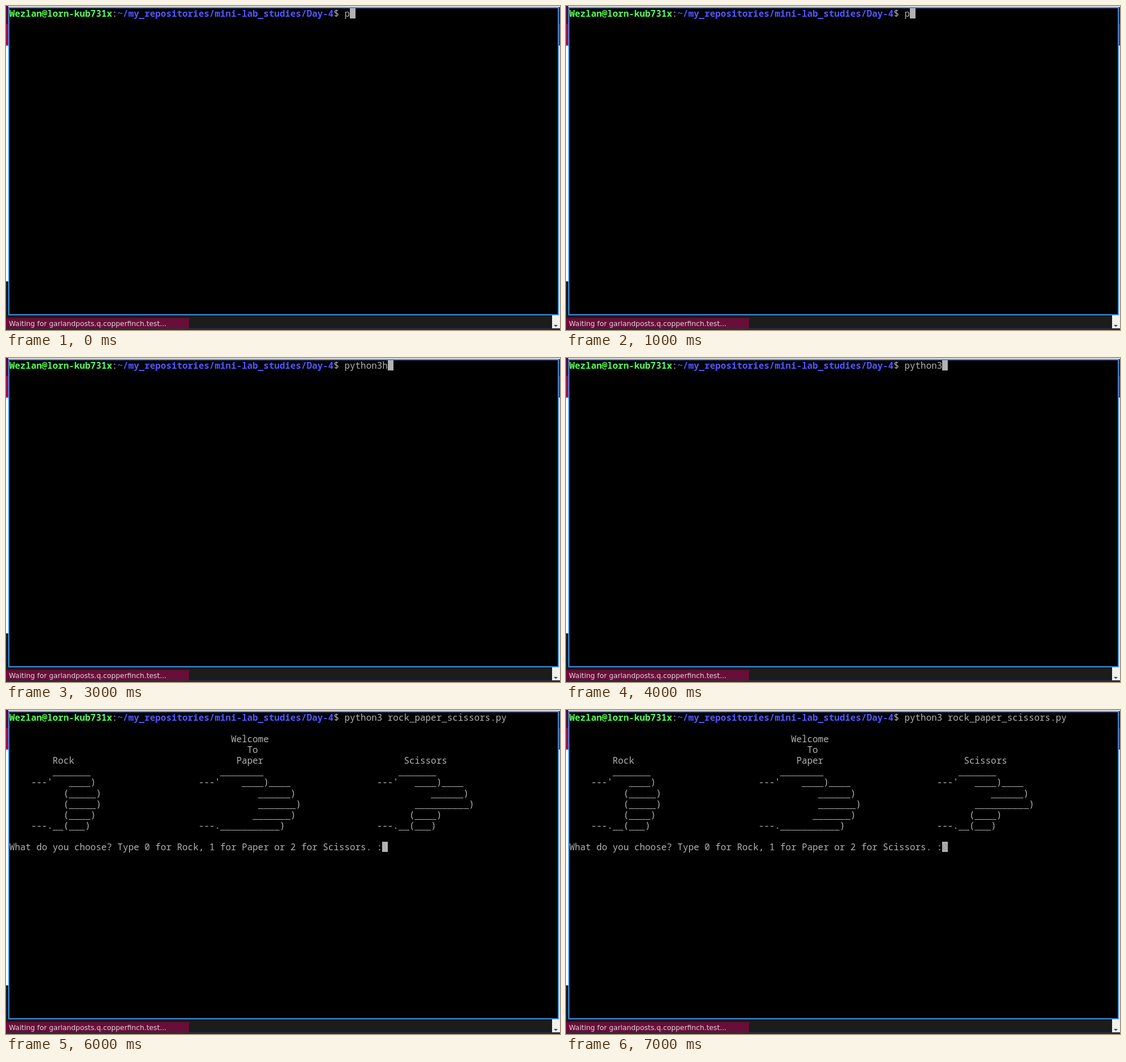
Recreate the animation shown at these times as an HTML page with a canvas. Size 978x573 px, loop 8000 ms.

```html
<!DOCTYPE html>
<html lang="en">
<head>
<meta charset="utf-8">
<title>Terminal game</title>
<style>
html, body { margin: 0; width: 978px; height: 573px; overflow: hidden; background: #000; }
canvas { display: block; }
</style>
</head>
<body>
<canvas id="stage" width="978" height="573"></canvas>
<script>
const ctx = document.getElementById("stage").getContext("2d");
const LOOP = 8000, STEP = 1000;
const CELL = 9.54, LINE = 19.08, LEFT = 6, TOP = 4;
const GREY = "#b2b2b2", GREEN = "#55ff55", BLUE = "#5555ff";
const COMMAND_COL = 62;

const COMMAND = "python3 rock_paper_scissors.py";
const typed = ["p", "p", "python3", "python3h", "python3", COMMAND + " ", COMMAND, COMMAND];
const QUESTION = "What do you choose? Type 0 for Rock, 1 for Paper or 2 for Scissors. :";

// [row, column, text, column, text, ...]
const output = [
  [2, 41, "Welcome"],
  [3, 44, "To"],
  [4, 8, "Rock", 42, "Paper", 73, "Scissors"],
  [5, 8, "_______", 39, "________", 72, "_______"],
  [6, 4, "---'   ____)", 35, "---'    ____)____", 68, "---'   ____)____"],
  [7, 10, "(_____)", 46, "______)", 78, "______)"],
  [8, 10, "(_____)", 46, "_______)", 75, "__________)"],
  [9, 10, "(____)", 45, "_______)", 74, "(____)"],
  [10, 4, "---.__(___)", 35, "---.___________)", 68, "---.__(___)"],
  [12, 0, QUESTION]
];

function rect(x, y, w, h, color) {
  ctx.fillStyle = color;
  ctx.fillRect(x, y, w, h);
}

// Places every glyph on the terminal grid; underscores join into solid lines.
function write(row, col, text, color = GREY, bold = false) {
  const baseline = Math.round(TOP + row * LINE + 15);
  ctx.font = `${bold ? "bold " : ""}15.9px "Noto Sans Mono", "DejaVu Sans Mono", monospace`;
  ctx.fillStyle = color;
  [...text].forEach((char, i) => {
    const x = LEFT + (col + i) * CELL;
    if (char === "_") ctx.fillRect(x, baseline + 2, CELL, bold ? 2 : 1);
    else ctx.fillText(char, x, baseline);
  });
  return col + text.length;
}

function cursor(row, col) {
  rect(Math.round(LEFT + col * CELL), Math.round(TOP + row * LINE), 10, 18, GREY);
}

function drawWindow() {
  rect(0, 0, 978, 573, "#1c1c1c");
  rect(0, 0, 978, 2, "#dcdcdc");
  rect(0, 0, 4, 32, "#5c0c30");
  rect(0, 32, 4, 38, "#a50a4c");
  rect(0, 70, 4, 417, "#fff");
  rect(976, 2, 2, 30, "#5c0c30");
  rect(976, 32, 2, 38, "#a50a4c");
  rect(976, 70, 2, 477, "#e4e4e4");
  rect(0, 570, 978, 3, "#292e3c");

  rect(964, 547, 14, 23, "#f0f0f0");
  ctx.fillStyle = "#444";
  ctx.beginPath();
  ctx.moveTo(967, 564);
  ctx.lineTo(974, 564);
  ctx.lineTo(970.5, 567.5);
  ctx.fill();

  rect(0, 552, 323, 18, "#6a0d39");
  ctx.font = '12.3px "DejaVu Sans", sans-serif';
  ctx.fillStyle = "#dfd3d8";
  ctx.fillText("Waiting for garlandposts.q.copperfinch.test...", 5, 566);

  rect(4, 2, 972, 545, "#3c8ee8");
  rect(6, 4, 968, 541, "#000");
}

function drawTerminal(step) {
  let col = write(0, 0, "Wezlan@lorn-kub731x", GREEN, true);
  col = write(0, col, ":");
  col = write(0, col, "~/my_repositories/mini-lab_studies/Day-4", BLUE, true);
  write(0, col, "$");
  col = write(0, COMMAND_COL, typed[step]);

  if (step < 6) {
    cursor(0, col);
    return;
  }
  for (const [row, ...parts] of output)
    for (let i = 0; i < parts.length; i += 2) write(row, parts[i], parts[i + 1]);
  cursor(12, QUESTION.length);
  if (step === 7) write(12, QUESTION.length, "0", "#969696");
}

function frame() {
  drawWindow();
  drawTerminal(Math.floor(performance.now() % LOOP / STEP));
  requestAnimationFrame(frame);
}
frame();
</script>
</body>
</html>
```
